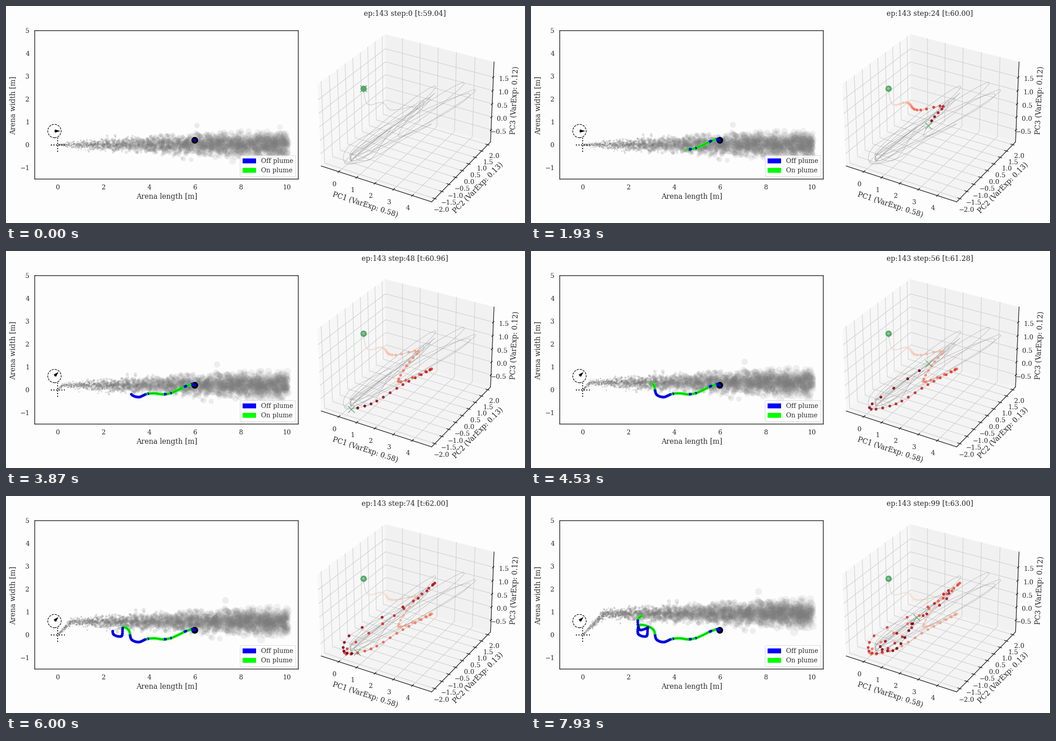
Write a matplotlib script that moves like this. It is 1156 px wide and 484 px high and loops after 8000 ms.

```python
import numpy as np
import matplotlib.pyplot as plt
from matplotlib.animation import FuncAnimation
from matplotlib.patches import Circle, Patch, Polygon

W, H = 1156, 484
FRAMES, LOOP_MS = 240, 8000
STEPS = 100
TURN = 34                      # step at which the wind swings by 45 degrees
INK, GREEN = "#262626", "#55a868"
LABEL, TICK = 15.7, 14.4

plt.rcParams["font.family"] = "DejaVu Serif"
plt.rcParams["text.color"] = INK

fig = plt.figure(figsize=(W / 72, H / 72), dpi=72, facecolor="#fdfdfd")

# Stage axes in pixels, y downwards
stage = fig.add_axes([0, 0, 1, 1])
stage.set(xlim=(0, W), ylim=(H, 0))
stage.axis("off")


def note(x, y, text, size=LABEL, **kw):
    kw = {"ha": "center", "va": "center", **kw}
    return stage.text(x, y, text, fontsize=size, **kw)


def glide(times, keys):
    """Smooth curve through the keys, sampled at every whole step."""
    times, keys = np.asarray(times, float), np.asarray(keys, float)
    slope = np.gradient(keys, times, axis=0)
    s = np.arange(STEPS)
    i = np.clip(np.searchsorted(times, s, "right") - 1, 0, len(times) - 2)
    gap = (times[i + 1] - times[i])[:, None]
    u = (s - times[i])[:, None] / gap
    ease = u * u * (3 - 2 * u)
    return (keys[i] * (1 - ease) + keys[i + 1] * ease
            + gap * u * (1 - u) * ((1 - u) * slope[i] - u * slope[i + 1]))


# ---------------------------------------------------------------- arena
arena = fig.add_axes([64.4 / W, 1 - 386 / H, 587 / W, 331.5 / H])
arena.set(xlim=(-1, 10.5), ylim=(-1.5, 5), facecolor="none",
          xticks=range(0, 11, 2), yticks=range(-1, 6))
arena.tick_params(length=0, pad=12, labelsize=TICK, labelcolor=INK)
for spine in arena.spines.values():
    spine.set(color=INK, linewidth=1.6)
note(358.5, 425, "Arena length [m]")
note(15.4, 221.5, "Arena width [m]", rotation=90)

arena.plot([-0.3, 0.3], [0, 0], ":", color="k", lw=2.2, zorder=3)
arena.plot([0, 0], [-0.3, 0.3], ":", color="k", lw=2.2, zorder=3)

HUB = np.array([-0.147, 0.6])
arena.add_patch(Circle(HUB, 0.292, fill=False, ls="--", lw=1.3, zorder=3))
ARROW = np.array([(0, 1.2), (1.7, 1.2), (0.5, 3.7), (12.7, 0),
                  (0.5, -3.7), (1.7, -1.2), (0, -1.2)]) / 51
needle = arena.add_patch(Polygon(ARROW + HUB, color="k", lw=0, zorder=3))

arena.legend(handles=[Patch(color="blue", label="Off plume"),
                      Patch(color="lime", label="On plume")],
             loc="lower right", fontsize=TICK, borderaxespad=0.43).set_zorder(8)

# Plume: puffs released at the origin, carried by the wind, spreading with age
rng = np.random.default_rng(7)
born = rng.uniform(-515, STEPS, 5 * (515 + STEPS))
sway = rng.normal(0, 0.084, born.size)
bulk = rng.uniform(0.75, 1.15, born.size)
puffs = arena.scatter([], [], linewidths=0, zorder=1)


def drift(s):
    early, late = np.minimum(s, TURN), np.maximum(s - TURN, 0)
    slow = 0.02 / np.sqrt(2)
    return np.array([0.02 * early + slow * late, slow * late])


def blow(step):
    live = born <= step
    age = step - born[live]
    x, y = drift(step)[:, None] - drift(born[live])
    y = y + sway[live] * np.sqrt(0.02 * age)
    size = bulk[live] * (0.8 + 0.015 * age)
    near = x < 10.03
    x, y, size = x[near], y[near], size[near]
    tint = np.full((x.size, 4), 0.49)
    tint[:, 3] = 0.08 + 0.3 * np.exp(-x / 3.5)
    puffs.set_offsets(np.column_stack([x, y]))
    puffs.set_sizes((2 * size) ** 2)
    puffs.set_facecolors(tint)


walk = glide(range(-6, 103, 6), [
    (6.2, -0.3), (5.97, 0.2), (5.65, 0.18), (5.27, 0), (4.92, -0.15),
    (4.58, -0.2), (4.22, -0.155), (3.87, -0.19), (3.53, -0.32), (3.21, -0.2),
    (3.1, 0.19), (2.85, 0.33), (2.78, -0.06), (2.42, 0.03), (2.47, 0.42),
    (2.86, 0.35), (2.48, 0.22), (2.42, 0.71), (2.8, 0.9)])
OFF = [(0, 3), (7, 8), (18, 18), (22, 23), (35, 35), (37, 51), (61, 77), (85, 95)]
hue = np.array(["blue" if any(a <= i <= b for a, b in OFF) else "lime"
                for i in range(STEPS)])

arena.plot(*walk[0], "o", color="k", ms=15, mew=0, zorder=4)
steps_taken = arena.scatter([], [], s=6.3 ** 2, linewidths=0, zorder=5)
walk_line, = arena.plot([], [], color="k", lw=0.9, alpha=0.6, zorder=6)

# ---------------------------------------------------------------- cube


def project(p):
    """Perspective view of the unit cube, in stage pixels."""
    x, y, z = np.asarray(p, float).T
    x, y, z = 1.143 * (x - 0.5), 1.143 * (y - 0.5), 0.857 * (0.987 * z - 0.5)
    u = 0.866 * x + 0.5 * y
    v = -0.25 * x + 0.433 * y + 0.866 * z
    depth = 10 - (0.433 * x - 0.75 * y + 0.5 * z)
    return np.column_stack([894 + 2466 * u / depth, 240 - 2466 * v / depth])


def draw(points, **kw):
    stage.plot(*project(points).T, **kw)


PANES = [([(0, 0, 0), (0, 1, 0), (0, 1, 1), (0, 0, 1)], "0.95"),
         ([(0, 1, 0), (1, 1, 0), (1, 1, 1), (0, 1, 1)], "0.9"),
         ([(0, 0, 0), (1, 0, 0), (1, 1, 0), (0, 1, 0)], "0.925")]
for corners, shade in PANES:
    stage.add_patch(Polygon(project(corners), fc=shade, ec="none", alpha=0.5, zorder=0))

# Per axis: tick values, tick fractions, grid route, tick mark, label offset
AXES = [
    (range(5), 0.165 + 0.1668 * np.arange(5), "{:d}",
     lambda t: [(t, 0, 0), (t, 1, 0), (t, 1, 1)],
     lambda t: [(t, -0.012, 0), (t, 0.018, 0)], (-10, 29), "center"),
    (np.arange(-2, 2.1, 0.5), np.linspace(0.05, 0.95, 9), "{:.1f}",
     lambda t: [(1, t, 0), (0, t, 0), (0, t, 1)],
     lambda t: [(1.012, t, 0), (0.982, t, 0)], (15.5, 26), "center"),
    (np.arange(-0.5, 1.6, 0.5), 0.157 + 0.165 * np.arange(5), "{:.1f}",
     lambda t: [(0, 0, t), (0, 1, t), (1, 1, t)],
     lambda t: [(1, 1.012, t), (1, 0.982, t)], (35, 4), "right"),
]
for values, fractions, form, route, mark, (dx, dy), ha in AXES:
    for value, t in zip(values, fractions):
        draw(route(t), color="0.8", lw=1.1, zorder=1)
        draw(mark(t), color=INK, lw=1.5, zorder=2)
        x, y = project(mark(t)).mean(axis=0)
        note(x + dx, y + dy, form.format(value).replace("-", "\u2212"), TICK, ha=ha)
for edge in ([(0, 0, 0), (1, 0, 0)], [(1, 0, 0), (1, 1, 0)], [(1, 1, 0), (1, 1, 1)]):
    draw(edge, color=INK, lw=1.5, zorder=2)

note(800.5, 443.5, "PC1 (VarExp: 0.58)", rotation=-18)
note(1051.5, 406, "PC2 (VarExp: 0.13)", rotation=45.4)
note(1133, 210.5, "PC3 (VarExp: 0.12)", rotation=87.4)
title = note(888.5, 17.2, "")

# Turning points of the state: (step, x, y)
turns = np.array([
    (0, 796, 184), (2, 801, 213), (7, 836, 215), (15, 868, 232), (19, 918, 224),
    (22, 899, 247), (27, 874, 291), (34, 948, 263), (40, 884, 298),
    (45, 813, 341), (51, 760, 341), (55, 865, 267), (62, 950, 199),
    (64, 918, 228), (68, 764, 312), (70, 751, 338), (74, 782, 348),
    (77, 827, 314), (82, 930, 211), (84, 926, 229), (90, 778, 336),
    (93, 806, 345), (99, 859, 271)])
state = glide(turns[:, 0], turns[:, 1:])

# Later cycles swing between a common low corner and differing far tips
phase = np.linspace(0, 2 * np.pi, 18)[:, None]
cycles = []
for tip in [(958, 178), (1022, 170), (945, 205), (1048, 186), (1035, 196)]:
    low = np.array([768, 338]) + rng.uniform(-10, 10, 2)
    span = tip - low
    side = span[::-1] * (-1, 1) / np.hypot(*span)
    width = rng.uniform(10, 17)
    cycles.append(low + span * (1 - np.cos(phase)) / 2 - side * width * np.sin(phase))
stage.plot(*np.vstack([state, *cycles]).T, color="0.5", lw=0.8, alpha=0.55, zorder=3)

stage.plot(*state[0], "o", color=GREEN, ms=14, mew=0, zorder=4)
cross, = stage.plot([], [], "x", color=GREEN, ms=15, mew=1.5, alpha=0.9, zorder=4)
trail = stage.scatter([], [], s=6.4 ** 2, linewidths=0, zorder=5)


def update(frame):
    tick = min((frame + 1) // 2, FRAMES // 2 - 1)
    step = max(0, (5 * tick - 1) // 6)
    title.set_text(f"ep:143 step:{step} [t:{59.04 + 0.04 * step:.2f}]")

    blow(step)
    a = np.pi / 4 if step > TURN else 0
    spin = np.array([(np.cos(a), np.sin(a)), (-np.sin(a), np.cos(a))])
    needle.set_xy(ARROW @ spin + HUB)

    steps_taken.set_offsets(walk[:step + 1])
    steps_taken.set_facecolors(hue[:step + 1])
    walk_line.set_data(*walk[:step + 1].T)

    age = np.arange(step) / max(step, 1)
    tint = plt.cm.Reds(age)
    tint[:, 3] = 0.35 + 0.55 * np.sqrt(age)
    trail.set_offsets(state[:step])
    trail.set_facecolors(tint)
    cross.set_data(*state[step:step + 1].T)
    return puffs, needle, steps_taken, walk_line, trail, cross, title


anim = FuncAnimation(fig, update, frames=FRAMES, interval=LOOP_MS / FRAMES,
                     repeat=True, blit=False)
plt.show()
```
